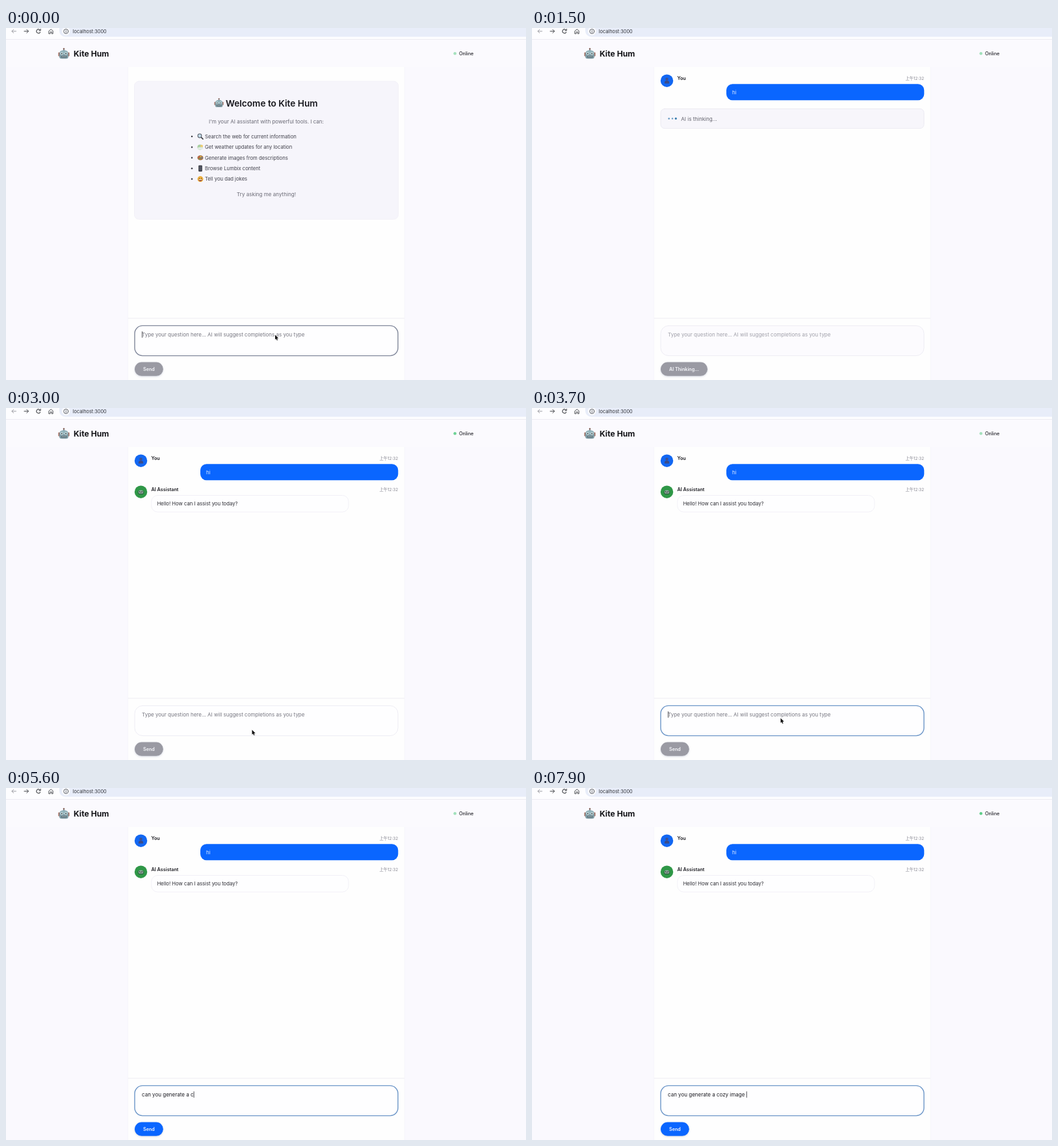
Recreate the animation shown at these times as an HTML page with a canvas. Size 800 by 542 pixels, loop 8000 ms.

```html
<!DOCTYPE html>
<html lang="en">
<head>
<meta charset="utf-8">
<title>Kite Hum</title>
<style>
html, body { margin: 0; width: 100%; height: 100%; overflow: hidden; background: #faf9fe; }
canvas { display: block; width: 800px; height: 542px; }
</style>
</head>
<body>
<canvas id="stage"></canvas>
<script>
const W = 800, H = 542, LOOP = 8000;
const SANS = 'Inter, "Noto Sans CJK SC", "Noto Sans CJK", sans-serif';
const BLUE = [10, 102, 255], GREY = [154, 154, 163], INK = '#1c1c22';
const HINT = 'Type your question here... AI will suggest completions as you type';
const PROMPT = 'can you generate a cozy image ';
const SENT = 790, REPLY = 2300, FOCUS = 3400, TYPE = 3900;

const cv = document.getElementById('stage');
const c = cv.getContext('2d');
const dpr = window.devicePixelRatio || 1;
cv.width = W * dpr;
cv.height = H * dpr;

const clamp = v => Math.max(0, Math.min(1, v));
const ramp = (t, from, len) => clamp((t - from) / len);
const ease = p => p * p * (3 - 2 * p);
const mix = (a, b, p) => `rgb(${a.map((v, i) => Math.round(v + (b[i] - v) * p))})`;

function text(str, x, y, size, color, weight = 400, align = 'left') {
  c.font = `${weight} ${size}px ${SANS}`;
  c.textAlign = align;
  c.textBaseline = 'alphabetic';
  c.fillStyle = color;
  c.fillText(str, x, y);
}

function rect(x, y, w, h, color) {
  c.fillStyle = color;
  c.fillRect(x, y, w, h);
}

function box(x, y, w, h, r, fill, stroke, width = 1) {
  c.beginPath();
  c.roundRect(x, y, w, h, r);
  if (fill) { c.fillStyle = fill; c.fill(); }
  if (stroke) { c.strokeStyle = stroke; c.lineWidth = width; c.stroke(); }
}

function disc(x, y, r, color, ry = r) {
  c.beginPath();
  c.ellipse(x, y, r, ry, 0, 0, Math.PI * 2);
  c.fillStyle = color;
  c.fill();
}

function line(points, color, width = 1, close = false) {
  c.beginPath();
  points.forEach(([x, y], i) => i ? c.lineTo(x, y) : c.moveTo(x, y));
  if (close) c.closePath();
  c.strokeStyle = color;
  c.lineWidth = width;
  c.lineCap = c.lineJoin = 'round';
  c.stroke();
}

// Draws in a local space scaled around (x, y)
function at(x, y, scale, draw) {
  c.save();
  c.translate(x, y);
  c.scale(scale, scale);
  draw();
  c.restore();
}

function robot(x, y, scale) {
  at(x, y, scale, () => {
    line([[0, -8], [0, -5]], '#5c7078', 1.4);
    disc(0, -7.6, 1.3, '#8b6a62');
    box(-8.6, -2, 2.6, 6, 1, '#a9776b');
    box(6, -2, 2.6, 6, 1, '#a9776b');
    box(-7, -5.4, 14, 13, [6, 6, 3.5, 3.5], '#7f9ba4');
    box(-6, -4.6, 12, 5, 4, '#92b3bb');
    for (const ex of [-3.2, 3.2]) {
      disc(ex, -.2, 2.1, '#e4f2f2');
      disc(ex, -.2, 1.1, '#33484f');
    }
    box(-4, 3.6, 8, 2.3, 1, '#3b4d55');
    for (let i = -1; i < 2; i++) rect(i * 2.2 - .6, 4, 1.2, 1.4, '#d9e2e3');
  });
}

function toolbar() {
  rect(0, 0, W, 17, '#fdfdff');
  box(82, -10, 740, 23.5, 9, '#e8edf9');
  rect(0, 17, W, 1, '#ececf2');
  line([[15.5, 5], [9, 5]], '#92949a', .9);
  line([[11.6, 2.4], [9, 5], [11.6, 7.6]], '#92949a', .9);
  line([[28, 5], [34.5, 5]], '#3e4045', 1);
  line([[31.9, 2.4], [34.5, 5], [31.9, 7.6]], '#3e4045', 1);
  c.beginPath();
  c.arc(50, 5, 3, .5, 5.5);
  c.lineWidth = 1.1;
  c.strokeStyle = '#3e4045';
  c.stroke();
  line([[53.2, 1.6], [53.2, 4], [50.8, 4]], '#3e4045', 1);
  line([[66.2, 4.4], [69.2, 2], [72.2, 4.4], [72.2, 8.8], [70.3, 8.8], [70.3, 6], [68.1, 6], [68.1, 8.8], [66.2, 8.8]], '#3e4045', .9, true);
  disc(92.3, 5, 6.5, '#f8f9fd');
  c.beginPath();
  c.arc(92.3, 5.2, 3.5, 0, Math.PI * 2);
  c.lineWidth = .8;
  c.strokeStyle = '#3e4045';
  c.stroke();
  line([[92.3, 4.9], [92.3, 7]], '#3e4045', .8);
  disc(92.3, 3.5, .5, '#3e4045');
  text('localhost:3000', 102.8, 7.9, 7.35, '#303238');
}

function header(t) {
  rect(0, 18, W, 42, '#fbfafe');
  robot(89, 39.6, 1);
  text('Kite Hum', 104, 44.2, 12.2, '#141418', 700);
  const glow = .5 + .5 * Math.cos((t - 775) / 1850 * Math.PI * 2);
  c.globalAlpha = .45 + .55 * glow;
  disc(690.7, 39.3, 2.3, '#4cc87c');
  c.globalAlpha = 1;
  text('Online', 697, 42, 7.3, '#27272d', 500);
}

const icons = [
  () => {
    line([[1, 1], [4, 4]], '#34363c', 1.7);
    disc(-1, -1, 3.4, '#555b66');
    disc(-1, -1, 2.4, '#c3dbe8');
  },
  () => {
    disc(-.5, 0, 4, '#a8cf9f');
    disc(2, -1.6, 2, '#f0cc72');
    box(-4, 0, 8, 3.6, 1.8, '#e3ece6');
  },
  () => {
    disc(0, 0, 4.6, '#a87549', 3.7);
    disc(-2, -1, 1, '#d9553f');
    disc(.6, -1.8, 1, '#e7c34c');
    disc(2.5, .2, 1, '#4b83bb');
    disc(-.8, 1.5, 1, '#55a25a');
  },
  () => {
    box(-2.8, -4.7, 5.6, 9.4, 1, '#303139');
    box(-2.1, -3.7, 4.2, 7.2, .3, '#50535f');
  },
  () => {
    disc(0, 0, 4.5, '#efb343');
    disc(-1.6, -1.2, .7, '#5b3c1c');
    disc(1.6, -1.2, .7, '#5b3c1c');
    box(-2.6, .5, 5.2, 2.6, [.4, .4, 2.4, 2.4], '#8c3d2a');
    rect(-2.1, .6, 4.2, .9, '#fff');
  }
];

function welcome() {
  box(197.5, 82, 406, 212.5, 7, '#f6f5fb', '#f0eff6', .8);
  robot(327.6, 115.5, .83);
  text('Welcome to Kite Hum', 338, 121, 13.65, '#17171c', 600);
  text("I'm your AI assistant with powerful tools. I can:", 400.5, 146.8, 8.05, '#6b6b76', 400, 'center');
  ['Search the web for current information', 'Get weather updates for any location',
    'Generate images from descriptions', 'Browse Lumbix content', 'Tell you dad jokes'
  ].forEach((item, i) => {
    const y = 167 + i * 16.4;
    disc(286, y, 1.25, '#3d3d46');
    at(299, y, 1, icons[i]);
    text(item, 306, y + 2.8, 7.7, '#43434d');
  });
  text('Try asking me anything!', 400.5, 258.8, 8.05, '#6b6b76', 400, 'center');
}

function stamp(y) {
  text('上午12:32', 603, y, 6.3, '#85858f', 400, 'right');
}

// Fades and slides a chat row into place
function enter(t, start, draw) {
  const p = ramp(t, start, 290);
  c.save();
  c.globalAlpha = clamp(p * 1.2);
  c.translate(0, 10.7 * (1 - p));
  draw();
  c.restore();
}

function userRow() {
  disc(207.5, 81.2, 9.7, '#1267f2');
  disc(207.5, 78.6, 2.2, '#41518d');
  box(203.9, 81.1, 7.2, 4.4, [3.2, 3.2, .8, .8], '#3a4b89');
  text('You', 223.5, 80.4, 7.25, INK, 600);
  stamp(80);
  box(299, 86.2, 304.3, 25, 9.5, '#0a66ff');
  text('hi', 308, 101.6, 7.7, '#e4eeff');
}

function replyRow() {
  disc(207.5, 129.2, 9.7, '#2f9747');
  at(207.5, 129.2, .52, () => {
    box(-8.4, -4.4, 16.8, 11.5, 4, '#27583a');
    box(-6.8, -4.6, 13.6, 10, 4, '#a3bab1');
    disc(-3, -.8, 1.8, '#26382f');
    disc(3, -.8, 1.8, '#26382f');
    rect(-3.8, 2.4, 7.6, 1.6, '#344a3f');
  });
  text('AI Assistant', 223.5, 128.4, 7.25, INK, 600);
  stamp(127.5);
  box(223.7, 134.5, 303.3, 25.6, 9.5, '#fefeff', '#efeef5', .8);
  text('Hello! How can I assist you today?', 232.4, 150, 7.7, '#2b2b32');
}

function thinking(t) {
  box(198, 124.4, 405, 30.2, 6, '#f7f6fb', '#e9e8f0', .8);
  for (let i = 0; i < 3; i++) {
    const k = .5 + .5 * Math.cos((t - 780 - i * 260) / 1120 * Math.PI * 2);
    c.globalAlpha = .7 + .3 * k;
    disc(210.7 + i * 5.3, 139.4, 1.15 + .6 * k, '#2773a9');
  }
  c.globalAlpha = 1;
  text('AI is thinking...', 229.3, 142.5, 8, '#65656f');
}

function typed(t) {
  if (t < SENT) return 'hi'.slice(0, t < 350 ? 0 : t < 500 ? 1 : 2);
  if (t < TYPE) return '';
  const n = t < 4300 ? (t - TYPE) / 100
    : t < 5600 ? 4 + (t - 4300) / 81.25
    : 20 + (t - 5600) / 230;
  return PROMPT.slice(0, Math.floor(n + .01));
}

function button(label, w, color) {
  c.save();
  c.shadowColor = 'rgba(40, 60, 110, .2)';
  c.shadowBlur = 3 * dpr;
  c.shadowOffsetY = dpr;
  box(198, 514.6, w, 21.2, 10.6, color);
  c.restore();
  text(label, 198 + w / 2, 527.8, 7.2, '#f6f7fb', 600, 'center');
}

function composer(t) {
  const busy = t >= SENT && t < REPLY;
  const focused = t < SENT || t >= FOCUS;
  const str = typed(t);
  rect(187.5, 446.5, 425.5, 1, '#efeef4');

  const rim = [236, 235, 243], lit = [108, 150, 200];
  let edge = mix(rim, lit, ramp(t, FOCUS, 200));
  if (t < SENT) edge = mix([129, 136, 155], lit, ramp(t, 300, 200));
  else if (busy) edge = mix(lit, rim, ramp(t, SENT, 200));
  box(198, 458.4, 405, 46.2, 12, busy ? '#fcfbfe' : '#fefeff', edge, focused ? 1.4 : .9);

  if (str) text(str, 209, 474.9, 8, INK);
  else text(HINT, 209, 474.9, 8, busy ? mix([120, 120, 128], [160, 160, 169], ramp(t, SENT, 250)) : '#777780');

  if (focused) {
    c.font = `400 8px ${SANS}`;
    c.textAlign = 'left';
    rect(209 + c.measureText(str).width + .2, 467.2, .8, 9.6, '#25252b');
  }

  let on = t >= TYPE ? ramp(t, TYPE + 100, 200) : 0;
  if (t < SENT) on = ramp(t, 350, 200);
  else if (busy) on = 1 - ramp(t, SENT, 230);
  button(busy ? 'AI Thinking...' : 'Send', busy ? 72 : 43.8, mix(GREY, BLUE, on));
}

function pointer(t) {
  let x = 414, y = 472.5;
  if (t >= 350) {
    if (t < 2700 || t >= TYPE) return;
    const a = ease(ramp(t, 2700, 300)), b = ease(ramp(t, 3050, 300));
    x = 373 + 5.5 * a + 4 * b;
    y = 509 - 13.5 * a - 18 * b;
  }
  at(x, y, .92, () => {
    c.beginPath();
    [[0, 0], [0, 8], [1.8, 6.4], [3, 9.2], [4.4, 8.6], [3.2, 5.9], [5.6, 5.8]].forEach(([px, py]) => c.lineTo(px, py));
    c.closePath();
    c.lineWidth = 1;
    c.strokeStyle = '#fff';
    c.stroke();
    c.fillStyle = '#111';
    c.fill();
  });
}

function draw(t) {
  c.setTransform(dpr, 0, 0, dpr, 0, 0);
  rect(0, 0, W, H, '#faf9fe');
  rect(187, 60, 426.5, H - 60, '#f4f3f9');
  rect(187.7, 60, 425.1, H - 60, '#fefefe');
  toolbar();
  header(t);
  if (t < SENT) welcome();
  else enter(t, SENT, userRow);
  if (t >= SENT && t < REPLY) thinking(t);
  if (t >= REPLY) enter(t, REPLY, replyRow);
  composer(t);
  pointer(t);
}

const begin = performance.now();
function tick() {
  draw((performance.now() - begin) % LOOP);
  requestAnimationFrame(tick);
}
tick();
</script>
</body>
</html>
```
